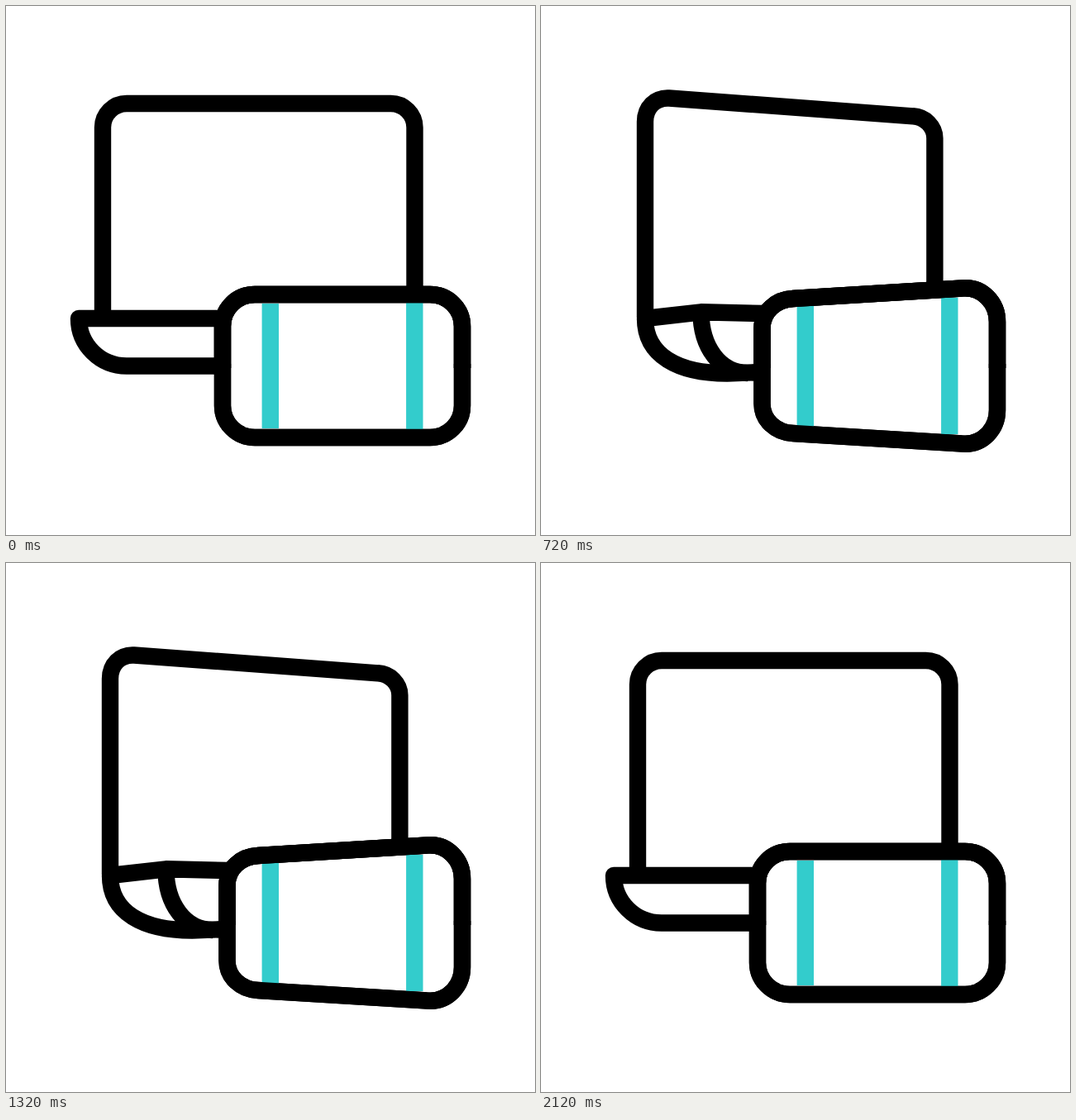
These frames come from a looping animation (640x640 px, 2560 ms). An HTML page:

```html
<!DOCTYPE html>
<html lang="en">
<head>
<meta charset="utf-8">
<title>Laptop and phone</title>
<style>
  html, body { margin: 0; height: 100%; overflow: hidden; background: #fff; }
  svg { display: block; width: 100vw; height: 100vh; }
  path { fill: none; stroke: #000; stroke-width: 20.4; stroke-linejoin: round; }
  #phone { fill: #fff; }
  #bars { stroke: #3cc; }
</style>
</head>
<body>
<svg viewBox="0 0 640 640">
  <clipPath id="inside"><path id="glass"/></clipPath>
  <g clip-path="url(#inside)"><path id="shine"/></g>
  <path id="screen"/>
  <path id="base"/>
  <path id="phone"/>
  <use href="#phone" transform="matrix(1 0 0 -1 0 871)"/>
  <path id="bars" d="M319.8 360V511M494.3 353V518"/>
  <use href="#rim"/>
  <g fill="none"><path id="rim" style="fill:none"/><use href="#rim" transform="matrix(1 0 0 -1 0 871)"/></g>
</svg>
<script>
const LOOP = 2560, STEP = 40;
const $ = id => document.getElementById(id);

// Each shape: front view, then turned view
const shapes = {
  screen: [
    'M117 378L117 147C117 131 130 118 146 118L465.5 118C481.5 118 494.5 131 494.5 147L494.5 348',
    'M126 377L126 140C126 123 138 110.5 155 111.5L450 133.3C464.5 134 476.4 146 476.4 160L476.4 348'],
  base: [
    'M268 378L88 378L88 378C88 410 114 435.5 146 435.5L268 435.5M88 378C88 410 114 435.5 146 435.5',
    'M268 372L193.5 370.3L126 378C126 423 166 444.5 225 444.5L268 443M193.5 370.3C193.5 413 217 444 250 444'],
  phone: [
    'M262 438L262 387.5C262 366 279.5 349 301 349L513 349C534.5 349 552 366 552 387.5L552 438',
    'M267.5 438L267.5 390C267.5 370 284 355 305 354L511 341.4C534 340 552 359 552 382L552 438']
};

function morph([from, to], k) {
  const ends = to.match(/[\d.]+/g);
  let i = 0;
  return from.replace(/[\d.]+/g, n => +n + (ends[i++] - n) * k);
}

// Symmetric ease: cubic-bezier(a, 0, 1 - a, 1)
function ease(x, a) {
  if (x <= 0) return 0;
  if (x >= 1) return 1;
  let lo = 0, hi = 1, s;
  for (let i = 0; i < 24; i++) {
    s = (lo + hi) / 2;
    const at = 3 * (1 - s) * s * ((1 - s) * a + s * (1 - a)) + s ** 3;
    if (at < x) lo = s; else hi = s;
  }
  return s * s * (3 - 2 * s);
}

function draw(now) {
  const t = Math.floor(now % LOOP / STEP) * STEP;
  const turn = ease((t - 120) / 600, .42) - ease((t - 1320) / 800, .68);
  for (const id in shapes) $(id).setAttribute('d', morph(shapes[id], turn));
  $('glass').setAttribute('d', $('screen').getAttribute('d'));
  $('rim').setAttribute('d', $('phone').getAttribute('d'));

  // The diagonal glint runs from the lower right corner to the upper left
  const sum = 819 - 566 * ease((t - 720) / 600, .42);
  const lit = t > 720 && t < 1320;
  $('shine').setAttribute('d', lit ? `M${sum} 0L${sum - 640} 640` : '');
}

const start = performance.now();
(function tick() {
  draw(performance.now() - start);
  requestAnimationFrame(tick);
})();
</script>
</body>
</html>
```
